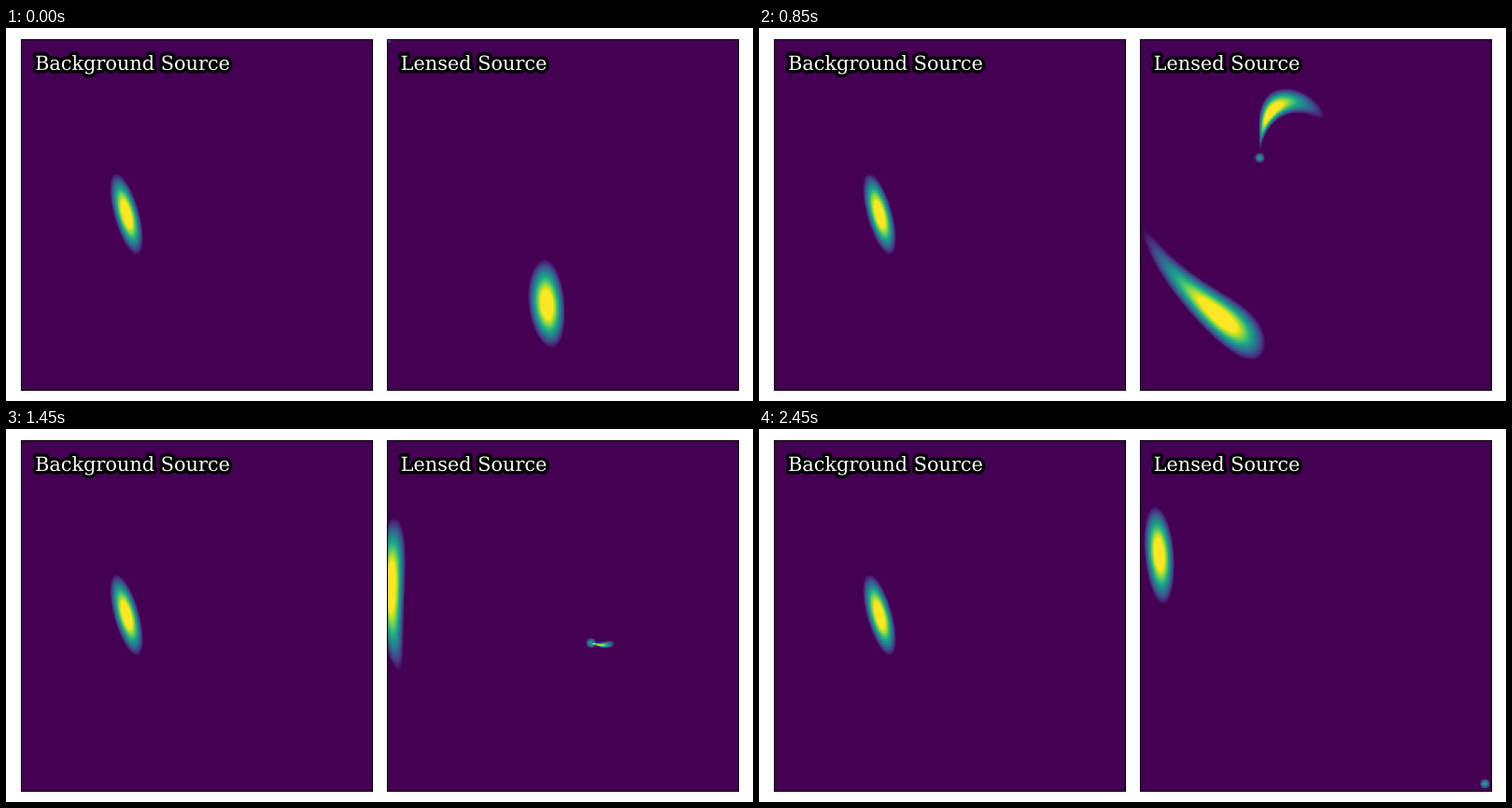
Animation of 800x400 px, one loop 2500 ms. Source, as a matplotlib script:

```python
import numpy as np
import matplotlib.pyplot as plt
import matplotlib.patheffects as pe
from matplotlib.animation import FuncAnimation

FRAMES, INTERVAL = 50, 50
HALF = 2.5                  # half the field of view
GRID = 250                  # image pixels per side
EINSTEIN = 1.5              # Einstein radius of the lens
SRC_X, SRC_Y = -1.0, 0.0
SRC_ANGLE, SRC_Q, SRC_SIZE = 1.3, 0.3, 0.6
LENS_SIZE, LENS_PEAK = 0.075, 0.6

axis = (np.arange(GRID) + 0.5) / GRID * 2 * HALF - HALF
X, Y = np.meshgrid(axis, axis)


def source(x, y):
    """Brightness of the tilted elliptical source, saturated in its core."""
    dx, dy = x - SRC_X, y - SRC_Y
    c, s = np.cos(SRC_ANGLE), np.sin(SRC_ANGLE)
    along = dx * c + dy * s
    across = (dy * c - dx * s) / SRC_Q
    r = np.hypot(along, across) / SRC_SIZE
    return np.clip(1.35 * (1 - r ** 1.2), 0, 1)


def lensed(pos):
    """Source seen through an isothermal lens at (pos, pos), plus lens light."""
    dx, dy = X - pos, Y - pos
    r = np.maximum(np.hypot(dx, dy), 1e-9)
    image = source(X - EINSTEIN * dx / r, Y - EINSTEIN * dy / r)
    glow = LENS_PEAK * np.clip(1 - (r / LENS_SIZE) ** 1.5, 0, 1)
    return np.maximum(image, glow)


def panel(ax, data, label):
    ax.set_xticks([])
    ax.set_yticks([])
    ax.text(0.04, 0.912, label, transform=ax.transAxes, color="white",
            fontsize=15, family="DejaVu Serif",
            path_effects=[pe.withStroke(linewidth=5, foreground="black")])
    return ax.imshow(data, cmap="viridis", vmin=0, vmax=1,
                     extent=(-HALF, HALF, HALF, -HALF))


fig, (left, right) = plt.subplots(1, 2, figsize=(8, 4), dpi=100)
fig.subplots_adjust(left=0.02, right=0.98, bottom=0.02, top=0.98, wspace=0.04)
panel(left, source(X, Y), "Background Source")
view = panel(right, lensed(-HALF), "Lensed Source")


def update(i):
    view.set_data(lensed(-HALF + 2 * HALF * i / FRAMES))
    return (view,)


anim = FuncAnimation(fig, update, frames=FRAMES, interval=INTERVAL,
                     repeat=True, repeat_delay=0)
plt.show()
```
